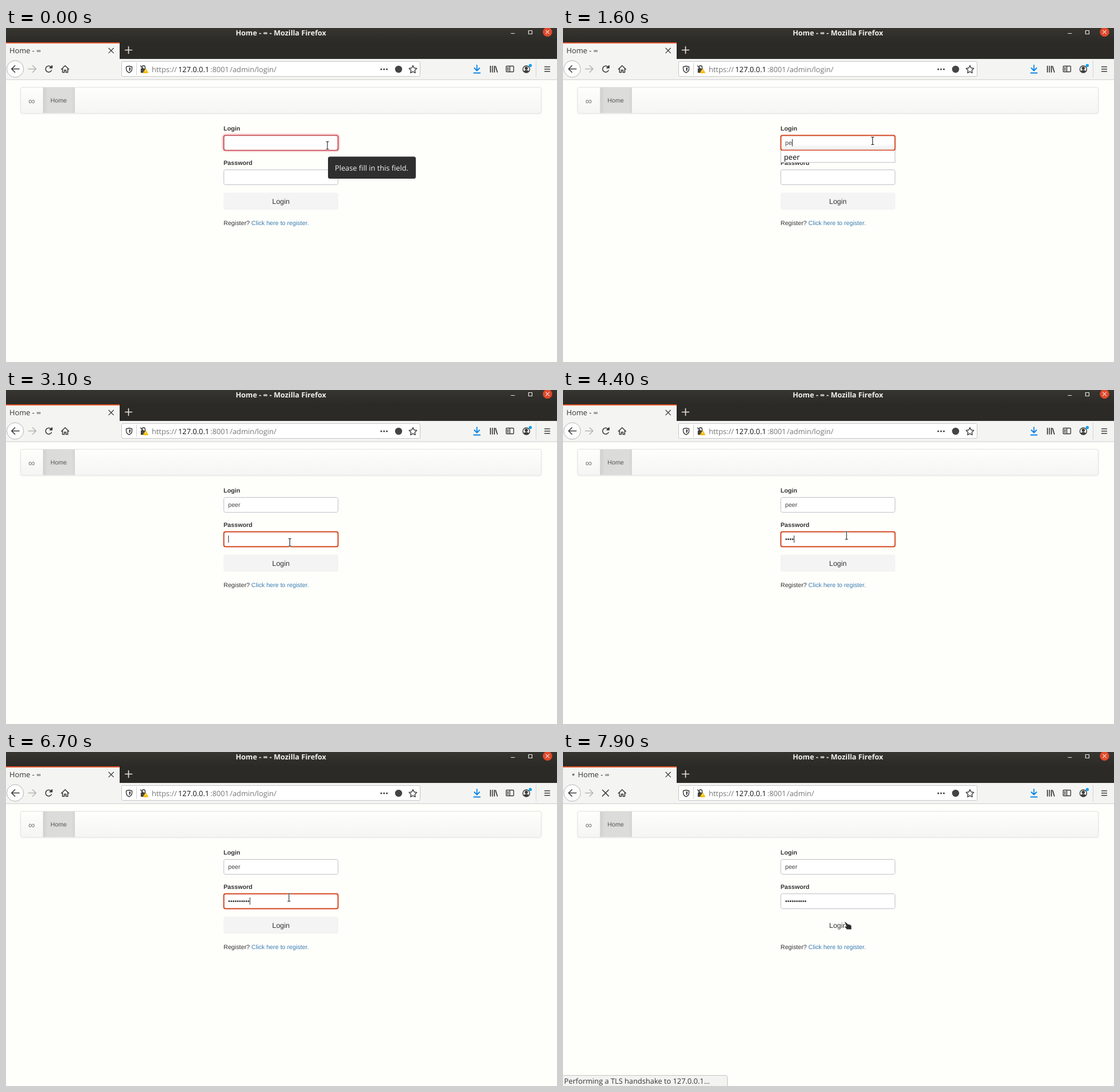
Write an HTML page that moves like this. It is 960 by 583 pixels and loops after 8000 ms.

```html
<!DOCTYPE html>
<html lang="en">
<head>
<meta charset="utf-8">
<title>Login</title>
<style>
html, body { margin: 0; width: 100%; height: 100%; overflow: hidden; background: #fefffb; }
svg { display: block; width: 100%; height: 100%; }
text { font: 10.67px "Liberation Sans", sans-serif; fill: #333; text-rendering: geometricPrecision; white-space: pre; }
.ui { font: 12.8px "Open Sans", "DejaVu Sans", sans-serif; }
.bold { font-weight: bold; }
.icon { fill: none; stroke: #3c3c3c; stroke-width: 1.6; stroke-linecap: round; stroke-linejoin: round; }
.field { fill: #fff; stroke: #bfbfc6; }
.field.invalid { stroke: #c4424e; stroke-width: 1.7; }
.field.focus { stroke: #d5451f; stroke-width: 2; }
</style>
</head>
<body>
<svg viewBox="0 0 960 583" preserveAspectRatio="none">
  <defs>
    <linearGradient id="titleBar" x2="0" y2="1"><stop stop-color="#373530"/><stop offset="1" stop-color="#2b2a26"/></linearGradient>
    <linearGradient id="navBar" x2="0" y2="1"><stop stop-color="#fefffb"/><stop offset="1" stop-color="#f5f6f3"/></linearGradient>
    <linearGradient id="navItem"><stop stop-color="#cfd0ce"/><stop offset=".14" stop-color="#dbdcda"/><stop offset=".9" stop-color="#dcdddb"/><stop offset="1" stop-color="#d3d4d2"/></linearGradient>
    <linearGradient id="listShade" x2="0" y2="1"><stop stop-color="#888" stop-opacity="0"/><stop offset="1" stop-color="#888" stop-opacity=".16"/></linearGradient>
    <filter id="soft" x="-10%" y="-50%" width="120%" height="200%"><feGaussianBlur stdDeviation="1.4"/></filter>
  </defs>

  <!-- Window and tabs -->
  <rect width="960" height="25" fill="url(#titleBar)"/>
  <rect y="24.5" width="960" height="29.5" fill="#2b2a27"/>
  <text class="ui bold" x="479" y="12.5" text-anchor="middle" style="font-size:12.6px;fill:#f2f1ee">Home - <tspan font-size="11">∞</tspan> - Mozilla Firefox</text>
  <g class="icon" style="stroke:#e8e7e3;stroke-width:1.2">
    <path d="M880 9.5h6M910.5 4.5h6v6h-6z"/>
    <circle cx="943.5" cy="7" r="7.6" fill="#e2492b" stroke="#e2492b"/>
    <path d="M940.7 4.2l5.6 5.6m0-5.6l-5.6 5.6"/>
    <path d="M207.5 38.5h12m-6-6v12" stroke-width="1.6"/>
  </g>
  <rect y="25" width="198" height="30" fill="#f4f5f3"/>
  <rect y="25" width="198" height="2" fill="#e2582f"/>
  <text id="tabTitle" class="ui" y="43.5">Home - <tspan font-size="11">∞</tspan></text>
  <circle id="loadDot" cy="39.5" r="2" fill="#777"/>
  <path class="icon" style="stroke-width:1.3" d="M179 35.2l8.4 8.4m0-8.4l-8.4 8.4"/>

  <!-- Toolbar -->
  <rect y="54" width="960" height="36" fill="#f4f5f3"/>
  <path d="M0 90.2h960" stroke="#cbccca"/>
  <circle cx="16" cy="71.5" r="14.6" fill="#fdfdfd" stroke="#b4b4b4"/>
  <g class="icon">
    <path d="M23 71.5H10m5.500-5.800L9.700 71.500l5.800 5.800"/>
    <path d="M39 71.500h13m-5.500-5.800l5.800 5.800-5.800 5.800" stroke="#b5b6b4"/>
    <path id="reload" d="M79.300 74a5.400 5.400 0 1 1-.3-5.300M80.300 65.800v4h-4z"/>
    <path id="stop" d="M68.800 66.300l10.600 10.600m0-10.600l-10.600 10.600"/>
    <path d="M96.500 72l6.500-6.300 6.500 6.300M98.500 71v6.500h3.200v-4h2.800v4h3.100V71"/>
  </g>
  <rect x="201.500" y="58.500" width="520" height="26" rx="2" fill="#fff" stroke="#c4c4c4"/>
  <path d="M227.500 61v21M923.500 57v29" stroke="#d2d2d2"/>
  <g class="icon" style="stroke-width:1.400">
    <path d="M214.500 66.500l5 1.200v3.300q0 5-5 7-5-2-5-7v-3.300z"/>
    <path d="M214.500 68.800v6.800q2.700-1.500 2.700-5v-1.200z" fill="#3c3c3c" stroke="none"/>
    <path d="M237 71v-2.500a2.700 2.700 0 0 1 5.400 0V71M235.500 71.500h8v6h-8z"/>
    <path d="M236 72h7v5h-7z" fill="#4a4a4a"/>
    <path d="M234.500 66l9 10"/>
    <path d="M243.300 71.500l4 6.500h-8z" fill="#ffbf00" stroke="#f5b800"/>
    <path d="M243.300 73.500v2" stroke="#fff" stroke-width="1"/>
    <path d="M709 65.500l2 4.300 4.700.6-3.400 3.300.8 4.700-4.100-2.300-4.100 2.300.8-4.700-3.400-3.300 4.700-.6z"/>
    <path d="M820.500 65v9m-4.500-4l4.500 4.500 4.500-4.500M815 78.500h11" stroke="#0a84e8" stroke-width="1.800"/>
    <path d="M844 66.500v10.500M847.500 66.500v10.500M851 66.500v10.500M853 67l3 10" stroke-width="1.700"/>
    <path d="M872.500 66.500h11q1 0 1 1v8q0 1-1 1h-11q-1 0-1-1v-8q0-1 1-1zM877.700 67v9M873.500 69.500h2m-2 2.300h2m-2 2.300h2"/>
    <circle cx="906.500" cy="72" r="6"/>
    <path d="M902.700 75.500q3.800-3 7.600 0-3.800 3.500-7.600 0z" fill="#3c3c3c"/>
    <circle cx="906.500" cy="70.300" r="2" fill="#3c3c3c"/>
    <circle cx="913.500" cy="65.500" r="2.700" fill="#10a0f0" stroke="none"/>
    <path d="M938.500 67.700h9m-9 4h9m-9 4h9"/>
  </g>
  <g fill="#444"><circle cx="653.800" cy="72" r="1.600"/><circle cx="658.700" cy="72" r="1.600"/><circle cx="663.600" cy="72" r="1.600"/><circle cx="684" cy="72" r="6.200"/></g>
  <text class="ui" y="77" style="fill:#777"><tspan x="254">https://</tspan><tspan x="300" fill="#111">127.0.0.1</tspan><tspan x="356">:8001</tspan><tspan id="path" x="390"></tspan></text>

  <!-- Page -->
  <rect x="25.500" y="104.500" width="907" height="45" rx="3.500" fill="none" stroke="#ccc" opacity=".5" filter="url(#soft)"/>
  <rect x="25.500" y="103.500" width="907" height="45.500" rx="3.500" fill="url(#navBar)" stroke="#e3e4e1"/>
  <rect x="64.500" y="104" width="55.500" height="44.500" fill="url(#navItem)"/>
  <text x="39" y="132.500" style="font-size:16px;fill:#777">∞</text>
  <text x="77.600" y="129.500" style="fill:#555">Home</text>
  <text class="bold" x="379" y="178.700">Login</text>
  <text class="bold" x="379" y="238.700">Password</text>
  <rect id="glow" x="378.500" y="186.500" width="201" height="27.500" rx="4" fill="none" stroke="#e0404a" filter="url(#soft)"/>
  <rect id="login" class="field" x="379.500" y="187.500" width="199" height="26" rx="3"/>
  <rect id="password" class="field" x="379.500" y="247.500" width="199" height="26" rx="3"/>
  <text id="loginText" x="387" y="204" style="fill:#444"></text>
  <text id="passwordText" x="387" y="264" style="fill:#333"></text>
  <rect id="caret" width="1" height="12.500" fill="#222"/>
  <g id="list">
    <rect x="381" y="202" width="196" height="10.500" fill="url(#listShade)"/>
    <path d="M379.500 214v20.700h199V214" fill="#fff" stroke="#bfbfc6"/>
    <text class="ui" x="385" y="230" style="fill:#000">peer</text>
  </g>
  <rect id="button" x="379" y="287.500" width="200" height="29.500" rx="3" fill="#f3f4f3"/>
  <text x="479" y="306.800" text-anchor="middle" style="font-size:12.440px">Login</text>
  <text x="379" y="344.300">Register? <tspan fill="#3a7bb0">Click here to register.</tspan></text>

  <g id="tooltip">
    <rect x="561" y="224.500" width="153" height="38.500" rx="3.500" fill="#2f2f2f"/>
    <text class="ui" x="573" y="248.500" style="fill:#f4f4f4">Please fill in this field.</text>
  </g>
  <g id="status">
    <path d="M-1 564.500h284q3.500 0 3.500 3.500v16H-1z" fill="#f3f4f2" stroke="#c4c5c3"/>
    <text class="ui" x="2" y="579">Performing a TLS handshake to 127.0.0.1…</text>
  </g>

  <g id="beam" fill="none">
    <path d="M-2.500-6.500h5M0-6.500v13M-2.500 6.500h5" stroke="#fff" stroke-width="2.600"/>
    <path d="M-2.500-6.500h2l.5.500.5-.5h2M0-6.500v13M-2.500 6.500h5" stroke="#222" stroke-width="1.100"/>
  </g>
  <path id="arrow" d="M0 0v13.500l3-2.700 2.200 4.800 2.200-1-2.200-4.600h4.200z" fill="#1c1c1c" stroke="#fff" stroke-width=".9"/>
  <path id="hand" d="M-6.500-6q1-1.500 2.500 0l3 3.200 4.500 1 2.300 2.300.2 6.500H-2.500l-3.700-4.500q-.5-1.500 1-1.500l1.700.500z" fill="#2b2b2b" stroke="#fff" stroke-width="1"/>
</svg>
<script>
const el = {};
document.querySelectorAll("[id]").forEach(node => el[node.id] = node);
const show = (node, on) => node.style.display = on ? "" : "none";

// Pointer keys: time in ms, x, y, shape
const pointerKeys = [
  [200, 560, 205, "beam"], [600, 539.5, 197, "beam"], [2500, 539.5, 197, "beam"],
  [2600, 533, 186.5, "arrow"], [2700, 526, 174, "arrow"], [2800, 514, 204, "beam"],
  [2900, 502, 232, "arrow"], [3000, 494.5, 266, "beam"], [3400, 494.5, 266, "beam"],
  [3500, 494, 254, "beam"], [6600, 494, 254, "beam"], [6700, 493, 254, "beam"],
  [6900, 493, 265, "beam"], [7000, 494, 279, "arrow"], [7100, 495, 292, "hand"], [7300, 497, 303, "hand"]
];
const loginKeys = [1500, 1600, 1700, 1900];
const passwordKeys = [3900, 4100, 4200, 4400, 4600, 4900, 5100, 5200, 5500, 5600];
const typed = (keys, t) => keys.filter(k => k <= t).length;

function pointerAt(t) {
  const next = pointerKeys.findIndex(k => k[0] > t);
  if (next === 0) return pointerKeys[0].slice(1);
  if (next < 0) return pointerKeys.at(-1).slice(1);
  const [t0, x0, y0, shape] = pointerKeys[next - 1], [t1, x1, y1] = pointerKeys[next];
  const p = (t - t0) / (t1 - t0);
  return [x0 + (x1 - x0) * p, y0 + (y1 - y0) * p, shape];
}

function render(t) {
  const onLogin = t >= 800 && t < 3100;
  const onPassword = t >= 3100 && t < 7400;
  const invalid = t < 1500;
  const loading = t >= 7600;

  el.loginText.textContent = "peer".slice(0, typed(loginKeys, t));
  el.passwordText.textContent = "•".repeat(typed(passwordKeys, t));
  el.login.classList.toggle("invalid", t < 800);
  el.login.classList.toggle("focus", onLogin);
  el.password.classList.toggle("focus", onPassword);
  show(el.glow, invalid);
  el.glow.setAttribute("stroke-width", onLogin ? 4.5 : 2.2);
  el.glow.setAttribute("opacity", onLogin ? .8 : .55);

  show(el.caret, onLogin || onPassword);
  const text = onLogin ? el.loginText : el.passwordText;
  const width = text.textContent ? text.getComputedTextLength() : 0;
  el.caret.setAttribute("x", 387.2 + width);
  el.caret.setAttribute("y", onLogin ? 194 : 254);

  show(el.list, t >= 1500 && t < 2700);
  show(el.tooltip, t < 400);
  el.button.setAttribute("opacity", Math.min(1, Math.max(0, (7400 - t) / 300)));

  show(el.status, loading);
  show(el.loadDot, loading);
  show(el.stop, loading);
  show(el.reload, !loading);
  el.loadDot.setAttribute("cx", 9 + (t - 7600) * .03);
  el.tabTitle.setAttribute("x", loading ? 26 : 6);
  el.path.textContent = loading ? "/admin/" : "/admin/login/";

  const [x, y, shape] = pointerAt(t);
  for (const name of ["beam", "arrow", "hand"]) show(el[name], name === shape);
  el[shape].setAttribute("transform", `translate(${x} ${y})`);
}

// The screen refreshes ten times a second.
const start = performance.now();
function tick() {
  const t = Math.max(0, performance.now() - start) % 8000;
  render(Math.floor(t / 100) * 100);
  requestAnimationFrame(tick);
}
tick();
</script>
</body>
</html>
```
